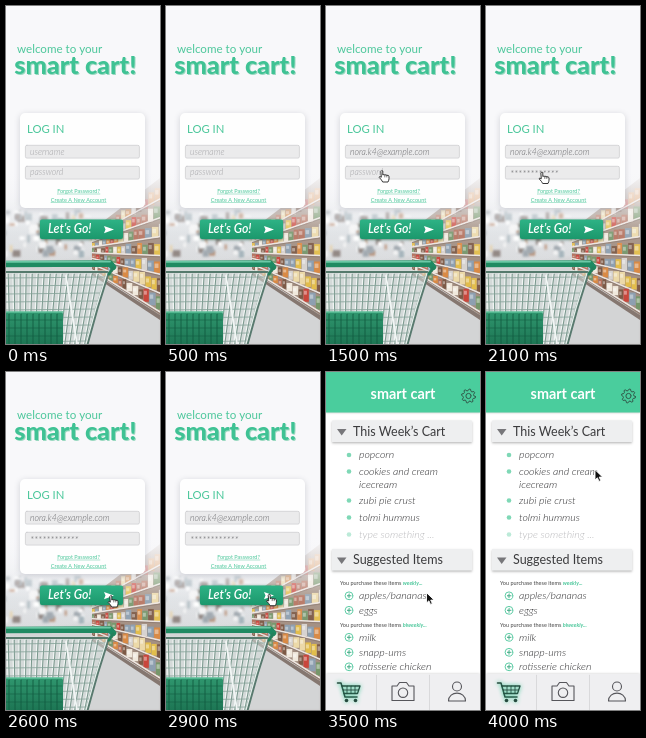
Write an HTML page with a canvas that moves like this. It is 154x338 px and loops after 4.1 s.

```html
<!DOCTYPE html>
<html lang="en">
<head>
<meta charset="utf-8">
<title>Smart cart</title>
<style>
html, body { margin: 0; width: 100%; height: 100%; overflow: hidden; background: #fff; }
canvas { display: block; width: 154px; height: 338px; }
</style>
</head>
<body>
<canvas id="stage"></canvas>
<script>
const W = 154, H = 338, LOOP = 4100, STEP = 100;
const NAME_FILLED = 1200, PASSWORD_FILLED = 1800, PRESSED = 3200, LIST_SHOWN = 3500;
const GREEN = '#4cc79b', DARK = '#3a3a3c', LIGHT_ITALIC = 'italic 300';
const scale = Math.max(1, window.devicePixelRatio || 1);
const canvas = document.getElementById('stage');
const screen = prepare(canvas);

function prepare(c) {
  c.width = W * scale;
  c.height = H * scale;
  const g = c.getContext('2d');
  g.scale(scale, scale);
  g.lineJoin = g.lineCap = 'round';
  return g;
}

function layer(paint) {
  const c = document.createElement('canvas');
  paint(prepare(c));
  return c;
}

function text(g, str, x, y, size, color, style = '', align = 'left') {
  g.font = `${style} ${size}px Lato, "Open Sans", sans-serif`;
  g.textAlign = align;
  g.fillStyle = color;
  g.fillText(str, x, y);
  return g.measureText(str).width;
}

function poly(g, points, fill) {
  g.beginPath();
  points.forEach(([x, y]) => g.lineTo(x, y));
  g.closePath();
  g.fillStyle = fill;
  g.fill();
}

function line(g, points, color, width) {
  g.beginPath();
  points.forEach(([x, y]) => g.lineTo(x, y));
  g.strokeStyle = color;
  g.lineWidth = width;
  g.stroke();
}

function box(g, x, y, w, h, r, fill, stroke) {
  g.beginPath();
  g.roundRect(x, y, w, h, r);
  g.fillStyle = fill;
  g.fill();
  if (stroke) {
    g.strokeStyle = stroke;
    g.lineWidth = 0.7;
    g.stroke();
  }
}

function disc(g, x, y, r, fill) {
  g.beginPath();
  g.arc(x, y, r, 0, 7);
  g.fillStyle = fill;
  g.fill();
}

function ring(g, x, y, r, color, width) {
  g.beginPath();
  g.arc(x, y, r, 0, 7);
  g.strokeStyle = color;
  g.lineWidth = width;
  g.stroke();
}

function vertical(g, y0, y1, ...colors) {
  const grad = g.createLinearGradient(0, y0, 0, y1);
  colors.forEach((c, i) => grad.addColorStop(i / (colors.length - 1), c));
  return grad;
}

function shadowed(g, color, blur, dy, paint) {
  g.save();
  g.shadowColor = color;
  g.shadowBlur = blur * scale;
  g.shadowOffsetY = dy * scale;
  paint();
  g.restore();
}

const mix = (a, b, k) => a + (b - a) * k;

function store(g) {
  let seed = 11;
  const rnd = () => (seed = seed * 16807 % 2147483647) / 2147483647;
  const pick = list => list[Math.floor(rnd() * list.length)];
  const goods = ['#c9463c', '#d98a45', '#e2bd4c', '#f0e8dc', '#8d9fb0', '#b4705c', '#7d5a46', '#ecd9a8', '#76966a', '#d7d3d0'];
  g.fillStyle = vertical(g, 170, H, '#f1f2f5', '#dfe2e5', '#d6d6d7', '#c9c7c6');
  g.fillRect(0, 165, W, H - 165);

  // far aisles
  g.save();
  g.filter = `blur(${1.3 * scale}px)`;
  for (let i = 0; i < 80; i++) {
    g.fillStyle = pick(['#9ea6ad', '#e6d3ad', '#b9927a', '#a4b3ba', '#f5f5f5', '#ffffff', '#8f8480']);
    g.fillRect(rnd() * 96 - 3, 203 + rnd() * 42, 2 + rnd() * 6, 2 + rnd() * 6);
  }
  poly(g, [[0, 262], [92, 250], [112, 262], [154, 314], [154, 338], [0, 338]], '#d3d4d5');
  g.restore();

  // shelves receding to the left
  g.save();
  g.filter = `blur(${0.35 * scale}px)`;
  poly(g, [[86, 224], [154, 172], [154, 309], [86, 264]], '#a38f82');
  const rows = 7;
  const shelfY = (row, x) => mix(mix(224, 264, row / rows), mix(174, 306, row / rows), (x - 86) / 68);
  for (let row = 0; row < rows; row++) {
    for (let x = 86; x < W;) {
      const w = 1.8 + (x - 86) / 18 + rnd() * 2, top = shelfY(row, x), bottom = shelfY(row + 1, x);
      const gap = (bottom - top) * (0.15 + rnd() * 0.25);
      g.fillStyle = pick(goods);
      g.fillRect(x, top + gap, w, bottom - top - gap);
      g.fillStyle = 'rgba(255,255,255,.4)';
      g.fillRect(x + 0.5, top + gap + 2, w * 0.55, (bottom - top) * 0.25);
      x += w + 0.4;
    }
    line(g, [[86, shelfY(row + 1, 86)], [W, shelfY(row + 1, W)]], '#ece4df', 1.6);
    line(g, [[86, shelfY(row + 1, 86) + 1.1], [W, shelfY(row + 1, W) + 1.5]], '#86736b', 0.7);
  }
  poly(g, [[86, 266], [154, 309], [154, 314], [86, 269]], '#857770');
  g.restore();
}

function trolley(g) {
  const rightEdge = y => 101 - (y - 264) * 0.27;
  poly(g, [[0, 264], [102, 264], [82, 338], [0, 338]], 'rgba(214,224,221,.55)');
  for (let i = 0; i < 16; i++) {
    const x = 1 + i * 6;
    line(g, [[x, 268], [x * 0.83 + 2, 338]], '#f1f5f4', 1.2);
    line(g, [[x + 1.2, 268], [x * 0.83 + 3.2, 338]], '#6f9084', 0.9);
  }
  for (let y = 272; y < 338; y += 8) {
    line(g, [[0, y], [rightEdge(y), y - 1]], '#84a398', 0.8);
  }
  box(g, -3, 306, 60, 34, 2, vertical(g, 306, 338, '#2f966e', '#1d7654'));
  for (let x = 3; x < 56; x += 6) line(g, [[x, 308], [x, 338]], '#145c42', 0.9);
  for (let y = 314; y < 338; y += 8) line(g, [[0, y], [56, y]], '#145c42', 0.6);
  line(g, [[0, 306], [57, 306]], '#5fc19a', 1.4);
  line(g, [[60, 270], [71, 338]], '#f2f6f5', 1.8);
  line(g, [[102, 267], [91, 302], [81, 338]], '#58796e', 3.2);
  line(g, [[101, 267], [90, 302], [80, 338]], '#e4eeea', 1.3);
  line(g, [[0, 266], [101, 266]], '#55796c', 2);
  line(g, [[0, 258], [104, 257.5], [107, 261]], '#1f8a62', 6.5);
  line(g, [[0, 255.8], [104, 255.6]], '#6bc9a5', 1.8);
  line(g, [[107, 262], [103, 268]], '#25805d', 3);
}

const loginPage = layer(g => {
  g.fillStyle = '#f8f8fa';
  g.fillRect(0, 0, W, H);
  store(g);
  trolley(g);
  g.fillStyle = vertical(g, 165, 258, 'rgba(248,248,250,1)', 'rgba(248,248,250,.66)', 'rgba(248,248,250,.1)', 'rgba(248,248,250,0)');
  g.fillRect(0, 160, W, 98);

  text(g, 'welcome to your', 11, 47, 11.6, GREEN);
  text(g, 'smart cart!', 9.3, 69.4, 25.3, '#9ad9c0', '800');
  text(g, 'smart cart!', 8.3, 68.4, 25.3, '#3fc294', '800');
  shadowed(g, 'rgba(80,85,105,.25)', 6, 1.5, () => box(g, 14, 107, 125, 95, 5, '#fefefe'));
  text(g, 'LOG IN', 21, 127, 11.3, GREEN);
  [139, 160].forEach(y => {
    box(g, 19.4, y + 0.3, 114, 12.8, 1.5, '#ebebec', '#cbcbcd');
  });
  [['Forgot Password?', 187], ['Create A New Account', 195.5]].forEach(([label, y]) => {
    const w = text(g, label, 72.5, y, 5.5, GREEN, '', 'center');
    line(g, [[72.5 - w / 2, y + 1], [72.5 + w / 2, y + 1]], GREEN, 0.45);
  });
});

function drawLogin(g, t) {
  g.drawImage(loginPage, 0, 0, W, H);
  const named = t >= NAME_FILLED, secret = t >= PASSWORD_FILLED;
  text(g, named ? 'nora.k4@example.com' : 'username', 24, 148.6, 8.7, named ? '#68686b' : '#a3a3a6', LIGHT_ITALIC);
  if (secret) text(g, '************', 24, 171.3, 10.3, '#68686b', LIGHT_ITALIC);
  else text(g, 'password', 24, 169.4, 8.7, '#a3a3a6', LIGHT_ITALIC);

  const fill = t >= PRESSED ? '#27b182' : vertical(g, 213, 233, '#2eb386', '#1c986c');
  shadowed(g, 'rgba(15,75,55,.65)', 3, 0.8, () => box(g, 34, 213.5, 83, 19.5, 2, fill));
  text(g, 'Let’s Go!', 42, 227.2, 12.3, '#fff', 'italic 600');
  poly(g, [[98, 220], [108, 223.6], [98, 227.2], [99.5, 223.6]], '#fff');
}

function section(g, y, label) {
  shadowed(g, 'rgba(0,0,0,.28)', 2.5, 1.2, () => box(g, 6, y, 140, 21.5, 0.5, '#eeeff0'));
  poly(g, [[11, y + 8.5], [20.5, y + 8.5], [15.7, y + 15]], '#77777a');
  text(g, label, 27, y + 15.2, 12.5, DARK);
}

function note(g, y, word) {
  const w = text(g, 'You purchase these items ', 14, y, 5.5, '#444');
  text(g, word, 14 + w, y, 5.5, GREEN, 'italic 700');
}

function gear(g, x, y) {
  g.beginPath();
  for (let i = 0; i < 32; i++) {
    const a = (i + 0.5) * Math.PI / 16, r = i % 4 < 2 ? 7 : 5.3;
    g.lineTo(x + r * Math.cos(a), y + r * Math.sin(a));
  }
  g.closePath();
  g.strokeStyle = '#31584a';
  g.lineWidth = 1;
  g.stroke();
  ring(g, x, y, 2.6, '#31584a', 1);
}

function bottomBar(g) {
  const ink = '#24493d', grey = '#55555a';
  shadowed(g, 'rgba(0,0,0,.3)', 3, -0.5, () => {
    g.fillStyle = '#efeff1';
    g.fillRect(0, 302, W, 36);
  });
  [50.5, 103.5].forEach(x => line(g, [[x, 303], [x, H]], '#d3d3d6', 0.8));
  shadowed(g, '#3fc997', 4, 0, () => {
    line(g, [[11.5, 311], [15, 311], [19, 325], [31, 325]], ink, 1.5);
    line(g, [[16, 314], [34, 314], [31.5, 321.5], [18, 321.5]], ink, 1.3);
    [21, 25, 29].forEach(x => line(g, [[x, 314], [x, 321.5]], ink, 0.9));
    line(g, [[17, 318], [32.5, 318]], ink, 0.9);
    [20.5, 29.5].forEach(x => disc(g, x, 328.5, 1.8, ink));
  });
  line(g, [[66, 314], [71, 314], [73.5, 310.5], [80.5, 310.5], [83, 314], [88, 314], [88, 328.5], [66, 328.5], [66, 314]], grey, 1.1);
  ring(g, 77, 320.7, 4.7, grey, 1.1);
  ring(g, 131, 314.5, 4.5, grey, 1.1);
  g.beginPath();
  g.moveTo(122.5, 329);
  g.bezierCurveTo(122.5, 318.5, 139.5, 318.5, 139.5, 329);
  g.closePath();
  g.stroke();
}

const listPage = layer(g => {
  g.fillStyle = '#fff';
  g.fillRect(0, 0, W, H);
  shadowed(g, 'rgba(0,0,0,.2)', 2, 0.5, () => {
    g.fillStyle = '#4acd9d';
    g.fillRect(0, 0, W, 40.5);
  });
  text(g, 'smart cart', 77, 27, 14.4, '#fff', '700', 'center');
  gear(g, 142.5, 24);

  section(g, 48.5, 'This Week’s Cart');
  [['popcorn', 86], ['cookies and cream', 102.5], ['icecream', 116], ['zubi pie crust', 131.5],
    ['tolmi hummus', 148.5], ['type something ...', 165.5]].forEach(([item, y], i) => {
    const blank = i === 5;
    if (i !== 2) disc(g, 23, y - 3, 2.3, blank ? '#bcead8' : '#7fd8b6');
    text(g, item, 33, y, 10.5, blank ? '#b8b8bb' : '#2c2c2e', LIGHT_ITALIC);
  });

  section(g, 177, 'Suggested Items');
  note(g, 212.5, 'weekly...');
  note(g, 254.7, 'biweekly...');
  [['apples/bananas', 227], ['eggs', 241.5], ['milk', 268.5], ['snapp-ums', 283.5], ['rotisserie chicken', 298]].forEach(([item, y]) => {
    ring(g, 23, y - 3.2, 3.9, GREEN, 0.9);
    line(g, [[21, y - 3.2], [25, y - 3.2]], '#36a67e', 0.9);
    line(g, [[23, y - 5.2], [23, y - 1.2]], '#36a67e', 0.9);
    text(g, item, 33, y, 10.5, '#2c2c2e', LIGHT_ITALIC);
  });
  bottomBar(g);
});

// time, x, y of the pointer tip
const path = [
  [500, 158, 184], [900, 114, 146], [1200, 66, 146], [1500, 54, 164], [1900, 54, 165.5],
  [2100, 54, 165.5], [2600, 103, 223], [3100, 100.5, 221], [3500, 100.5, 221], [4000, 109, 98], [4100, 109, 98]
];

function pointerAt(t) {
  const i = path.findIndex(p => p[0] > t);
  if (i < 1) return null;
  const [t0, x0, y0] = path[i - 1], [t1, x1, y1] = path[i];
  const k = (t - t0) / (t1 - t0), e = k * k * (3 - 2 * k);
  return [mix(x0, x1, e), mix(y0, y1, e)];
}

const within = (x, y, l, t, r, b) => x >= l && x <= r && y >= t && y <= b;

const arrow = new Path2D('M0 0V10L2.4 7.8L4 11.4L5.8 10.6L4.2 7.1H7.4Z');
const hand = new Path2D('M1 1.2Q1.8-.4 2.8 1V5Q4 4 4.9 5Q6 4.3 6.9 5.4Q8.2 4.8 9 6.2V8.7Q9 10 8 12H2.7Q1.8 10-.8 7.4Q-1 5.8 1 7Z');

function drawPointer(g, t) {
  const at = pointerAt(t);
  if (!at) return;
  const [x, y] = at;
  const hot = t < LIST_SHOWN && (within(x, y, 19, 139, 133, 153) || within(x, y, 19, 160, 133, 174) || within(x, y, 34, 213, 117, 233));
  g.save();
  g.translate(x, y);
  g.fillStyle = hot ? '#fff' : '#111';
  g.strokeStyle = hot ? '#222' : '#fff';
  g.lineWidth = 0.9;
  const shape = hot ? hand : arrow;
  g.fill(shape);
  g.stroke(shape);
  if (hot) [4.8, 6.8].forEach(fx => line(g, [[fx, 5.4], [fx, 7]], '#222', 0.6));
  g.restore();
}

function draw(t) {
  if (t < LIST_SHOWN) drawLogin(screen, t);
  else screen.drawImage(listPage, 0, 0, W, H);
  drawPointer(screen, t);
}

const start = performance.now();
function tick(now) {
  const t = Math.max(0, now - start) % LOOP;
  draw(Math.floor(t / STEP) * STEP);
  requestAnimationFrame(tick);
}
draw(0);
requestAnimationFrame(tick);
</script>
</body>
</html>
```
